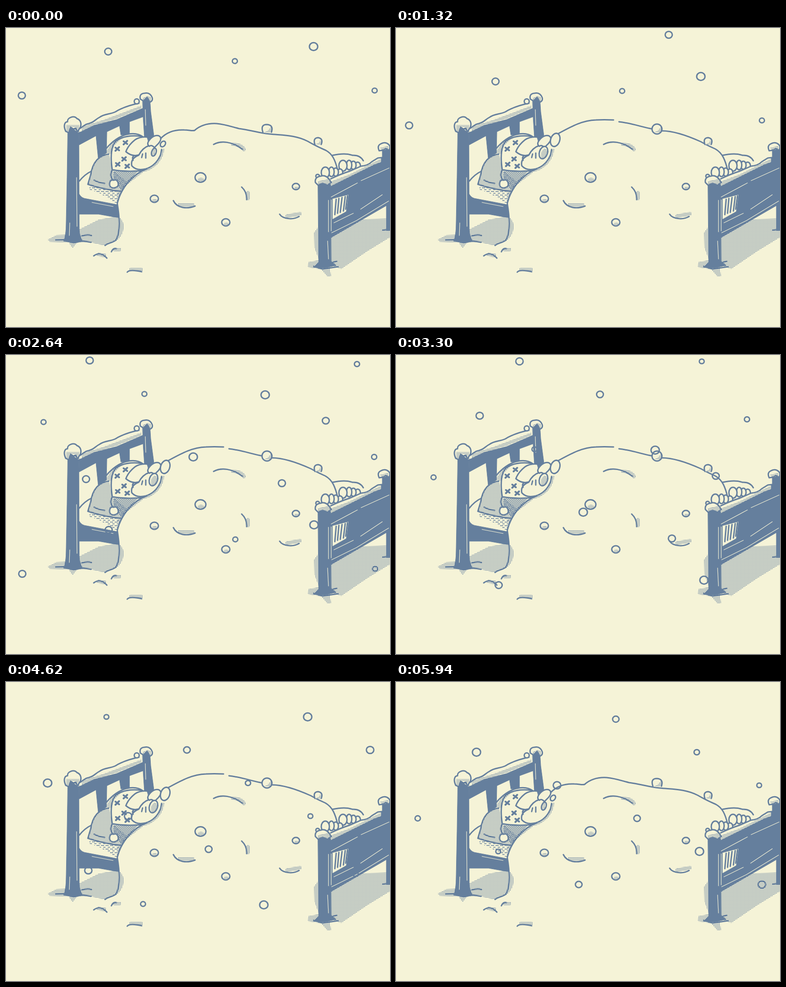
An HTML page that plays this animation: 849x660 px, repeating every 6.27 s.

```html
<!DOCTYPE html>
<html lang="en">
<head>
<meta charset="utf-8">
<title>Snowed in</title>
<style>
  html, body { margin: 0; height: 100%; overflow: hidden; background: #f5f3d7; }
  svg { display: block; width: 849px; height: 660px; }
  path, ellipse, circle { fill: none; stroke: #657f9d; stroke-width: 3; stroke-linecap: round; stroke-linejoin: round; }
  .ink { fill: #657f9d; stroke-width: 1; }
  .paper { fill: #f5f3d7; }
  .blank { fill: #f5f3d7; stroke: none; }
  .scratch { stroke: #f5f3d7; stroke-width: 1.2; }
  .tone { fill: url(#tone); stroke: none; }
  .rub { stroke: url(#tone); stroke-width: 8; }
  .deep { fill: url(#deep); stroke: none; }
  .dash { fill: url(#dash); stroke: none; }
  pattern path { fill: #657f9d; stroke: none; }
</style>
</head>
<body>
<svg viewBox="0 0 849 660">
  <defs>
    <pattern id="tone" width="3" height="3" patternUnits="userSpaceOnUse"><path d="M0 0h1.7v1.7h-1.7z"/></pattern>
    <pattern id="deep" width="4" height="4" patternUnits="userSpaceOnUse"><path d="M0 0h2v2h-2zM2 2h2v2h-2z"/></pattern>
    <pattern id="dash" width="10" height="8" patternUnits="userSpaceOnUse"><path d="M0 0h7v1.5h-7zM5 4h5v1.5h-5z"/></pattern>
  </defs>

  <!-- ground shadows -->
  <path class="tone" d="M92 467L112 457L135 456L165 443L205 423L248 415Q263 428 260 443Q257 460 244 470L216 480L186 473L158 473L147 486L139 474L97 472Z"/>
  <path class="tone" d="M681 452L700 425L849 420V462L800 492L741 532L714 522L719 547L711 549L697 533L667 528L668 517L692 512L682 485Z"/>

  <!-- headboard -->
  <path class="ink" d="M161 231L195 215L245 202L303 177V196L273 207V236H254L251 216L223 229L222 276L204 288L199 238L162 258Z"/>
  <path class="ink" d="M302 155L318 153L320 185L327 238L322 248L306 240L303 195Z"/>
  <path class="ink" d="M137 220L161 222L162 445Q163 462 170 471L150 475L127 470Q133 460 133 430L135 330Z"/>
  <path class="ink" d="M162 367Q167 376 178 377L246 390L250 419L205 411L162 411Z"/>
  <path d="M110 468L150 467L188 473M168 459Q180 455 189 458"/>
  <path class="scratch" d="M156 330L157 438M141 430L140 458M149 222L160 230M308 180L309 215M190 385L237 394"/>
  <path class="blank" d="M162 224Q180 207 200 203Q212 190 240 187Q265 172 294 167L302 174L245 199L192 215L165 229Z"/>
  <path class="tone" d="M170 217L215 203L250 190L300 171V177L245 200L195 215L166 230Z"/>
  <path d="M163 222C172 217 174 212 183 211C195 208 197 202 207 197C218 189 230 191 242 185C258 175 275 170 294 166"/>
  <circle class="paper" cx="289" cy="162" r="5.5"/>
  <path class="paper" d="M297 157Q294 145 306 144Q318 141 323 153Q326 160 318 164L312 153L304 161Z"/>
  <path class="tone" d="M302 155Q314 147 321 153L319 162L312 154L304 161Z"/>
  <path class="paper" d="M132 228C126 215 130 207 136 207C135 198 150 192 157 200C166 203 168 214 163 221L158 229L154 221L149 223L143 219L139 231Z"/>
  <path class="tone" d="M133 214H163L158 227L154 219L143 217L138 229L133 226Z"/>

  <!-- pillow and mattress -->
  <path class="blank" d="M162 338Q174 323 191 315L182 345Z"/>
  <path d="M162 338Q174 323 189 316"/>
  <path class="dash" d="M184 349L256 361L246 388L236 382L206 364L185 357Z"/>

  <!-- nightcap -->
  <path class="blank" d="M229 278C204 280 191 298 187 325L181 345L228 357L257 360C264 343 278 328 292 317L236 314L232 290Z"/>
  <path class="tone" d="M229 278C204 280 191 298 187 325L181 345L228 357L257 360L268 340L236 314L232 290Z"/>
  <path class="deep" d="M238 316L291 317L267 342L256 360L238 334Z"/>
  <path d="M230 278C204 280 191 298 187 325L181 345Q213 356 256 361M195 336Q206 342 218 343"/>
  <path class="blank" d="M228 278Q240 240 270 234Q292 231 304 241L300 315L235 314Z"/>
  <path class="tone" d="M220 276Q236 246 260 239L239 260L233 278Z"/>
  <path d="M208 285Q230 249 260 237Q287 228 304 241M235 313C230 282 233 258 244 249Q264 235 299 239M236 313Q262 318 302 315M235 313Q228 325 236 335"/>
  <path class="paper" d="M229 343Q230 334 238 336Q246 333 248 343Q250 351 239 353Q228 353 229 343Z"/>
  <path style="stroke-width:4" d="M242 264l8 6m0-7l-8 8M260 250l8 6m0-7l-8 8M257 286l8 6m0-7l-8 8M243 298l8 6m0-7l-8 8M264 302l8 6m0-7l-8 8"/>

  <!-- face -->
  <path class="blank" d="M278 302Q276 286 293 281L318 250L340 248Q350 270 339 286Q328 307 309 312Q289 316 278 302Z"/>
  <path class="tone" d="M350 266Q348 290 330 305Q317 316 305 317L266 347L250 374L246 367Q262 337 290 320L324 306Q339 291 343 269Z"/>
  <path class="paper" d="M265 273Q270 259 285 247Q297 239 313 241L318 259Q302 264 294 280Q279 285 265 273Z"/>
  <path class="paper" d="M317 261Q309 256 319 245Q329 235 338 238Q347 243 337 255L328 264Q322 257 317 261Z"/>
  <path d="M293 281Q275 288 278 304Q288 316 309 311Q332 304 342 279L344 268M283 282Q278 285 281 292M302 278L300 286M309 276V287"/>
  <path d="M311 311C285 320 255 349 246 387C251 417 254 450 243 468C237 474 226 474 219 480"/>

  <!-- breathing: out, then in -->
  <g id="out">
    <path d="M342 244C355 230 374 224 394 225C405 225 412 228 417 226C432 213 449 210 466 211C486 213 499 218 515 222C540 225 560 232 583 234C612 237 640 236 667 250Q688 262 707 270C722 278 728 292 733 313"/>
    <ellipse class="paper" cx="347" cy="256" rx="5" ry="7" transform="rotate(38 347 256)"/>
    <ellipse class="paper" cx="327" cy="274" rx="5" ry="9" transform="rotate(18 327 274)"/>
    <path class="tone" d="M325 269L331 266L329 280L324 280Z"/>
    <path class="blank" d="M567 231Q561 213 577 213Q592 214 588 232Z"/>
    <path d="M568 230Q562 213 577 213Q592 214 587 230"/>
  </g>
  <g id="in">
    <path d="M357 234C385 219 410 204 442 203Q460 202 481 203M493 207C520 210 545 219 568 223M588 227C615 227 645 238 674 251Q690 260 706 267C722 276 728 292 733 313"/>
    <ellipse class="paper" cx="352" cy="247" rx="10" ry="15" transform="rotate(18 352 247)"/>
    <ellipse class="paper" cx="326" cy="275" rx="9" ry="14" transform="rotate(18 326 275)"/>
    <ellipse class="tone" cx="327" cy="277" rx="6" ry="11" transform="rotate(18 327 277)"/>
    <circle class="paper" cx="577" cy="223" r="11"/>
  </g>
  <path class="tone" d="M571 230Q584 226 585 216Q592 224 585 231Z"/>
  <path class="blank" d="M683 257Q678 243 690 242Q702 244 697 257Z"/>
  <path d="M683 257Q678 243 690 242Q702 244 697 257"/>
  <path class="tone" d="M685 256Q694 254 695 246Q700 254 693 258Z"/>

  <!-- quilt folds and snowballs -->
  <path class="rub" d="M502 257Q520 257 526 268M535 364V376M384 390L412 390M622 415L650 410M205 500L218 502M240 489H251M276 533H299"/>
  <path d="M459 257C475 248 500 250 523 268M521 351Q533 362 532 379M370 381C378 398 400 400 418 393M605 411C612 422 635 424 648 416M194 503Q209 492 223 508M233 494Q237 485 244 487M268 539Q273 532 300 538"/>
  <g id="balls"></g>

  <!-- feet -->
  <path d="M722 281Q750 275 766 281Q783 280 790 293"/>
  <g id="toes"></g>

  <!-- footboard -->
  <path class="blank" d="M719 330L760 315L832 285V300L719 350Z"/>
  <path class="tone" d="M720 338L760 323L830 288V302L720 351Z"/>
  <path d="M718 333Q738 323 760 316L785 305Q800 304 809 295L822 287L831 286V297L812 304"/>
  <path class="ink" d="M717 350L812 303L832 298V271L849 266V447H841V392L718 463Z"/>
  <path class="ink" d="M690 343L718 345L719 515L730 524L703 530L680 528L691 517Z"/>
  <path d="M680 526L700 532L734 527M716 519L731 515M833 446L849 444"/>
  <path class="blank" d="M722 377L757 368L752 405L722 422Z"/>
  <path d="M730 378L727 412M736 376L733 409M743 374L739 407M750 372L746 404M755 370L751 400"/>
  <path class="scratch" d="M719 373L777 342M785 337L847 309M720 452L775 425L846 382M719 379V448M725 430L768 409M784 400L832 368M713 380V450M711 470L713 510"/>
  <circle class="paper" cx="689" cy="327" r="4"/>
  <path class="paper" d="M684 341Q682 329 696 327Q709 322 719 341L711 347L700 343L690 347Z"/>
  <path class="tone" d="M690 338L712 333L717 341L710 346L699 342L690 346Z"/>
  <path class="paper" d="M825 271Q820 260 828 256Q838 250 846 257Q851 262 847 270L840 266L832 270Z"/>
  <path class="tone" d="M828 264L846 260V268L838 265L830 270Z"/>

  <g id="snow"></g>
</svg>
<script>
const byId = id => document.getElementById(id);

function ellipse(parent, cx, cy, rx, ry, style = "") {
  const el = document.createElementNS("http://www.w3.org/2000/svg", "ellipse");
  const attrs = { cx, cy, rx, ry, class: style };
  for (const key in attrs) el.setAttribute(key, attrs[key]);
  return byId(parent).appendChild(el);
}

for (const [x, y, r] of [[430, 330, 12], [641, 350, 8], [328, 377, 9], [486, 429, 9]]) {
  ellipse("balls", x, y, r, r * .88, "paper");
  ellipse("balls", x + 1, y + r * .4, r * .6, r * .35, "tone");
}

// Far foot first; small toes before the big one
for (const [x, y] of [[745, 304], [706, 319]]) {
  for (let toe = 3; toe > 0; toe--)
    ellipse("toes", x + 4 + 9.5 * toe, y - 2 + toe / 2, 6, 12 - toe * 1.5, "paper");
  ellipse("toes", x, y, 9, 12, "paper");
}

const mod = (a, n) => ((a % n) + n) % n;

// Opening flurry, then evenly spaced rows that step sideways and wrap
const starts = [
  [35, 149], [226, 52], [506, 73], [680, 41], [815, 138], [176, -60], [609, -51], [82, -186],
  [413, -109], [813, -109], [706, -189], [184, -322], [305, -248], [572, -246], [775, -314]
];
for (let row = 0; row < 9; row++) {
  const y = -369 - 73 * row;
  starts.push([mod(450 - 178 * row, 486), y]);
  if (row % 8) starts.push([500 + mod(313 - 138 * row, 408), y]);
}
const flakes = starts.map(([x, y], i) => {
  const r = 7.2 + 2 * Math.cos(2.5 * (i - 3));
  return { x, y, r, el: ellipse("snow", x, y, r, r * .95) };
});

const STEP = 330, STEPS = 19, GROUND = 516;

// Wind path as [step, fall, drift]; the flurry starts over after step 3
const wind = [[0, 0, 0], [3, 213, -8], [4, 66, -6], [6, 203, -2], [8, 334, 1], [12, 578, 1], [14, 738, -2], [18, 1035, 2]];

function windAt(step) {
  const next = Math.max(1, wind.findIndex(key => key[0] >= step));
  const [from, to] = [wind[next - 1], wind[next]];
  const part = (step - from[0]) / (to[0] - from[0]);
  return [1, 2].map(i => from[i] + (to[i] - from[i]) * part);
}

function draw(now) {
  const step = Math.floor(now / STEP) % STEPS;
  const inhaled = step % 6 >= 2 && step % 6 <= 4;
  byId("in").style.display = inhaled ? "" : "none";
  byId("out").style.display = inhaled ? "none" : "";

  const [fall, drift] = windAt(step);
  for (const { x, y, r, el } of flakes) {
    const cy = y + fall;
    el.setAttribute("cx", x + drift);
    el.setAttribute("cy", cy);
    el.style.display = cy > r && cy < GROUND ? "" : "none";
  }
  requestAnimationFrame(draw);
}
draw(0);
</script>
</body>
</html>
```
